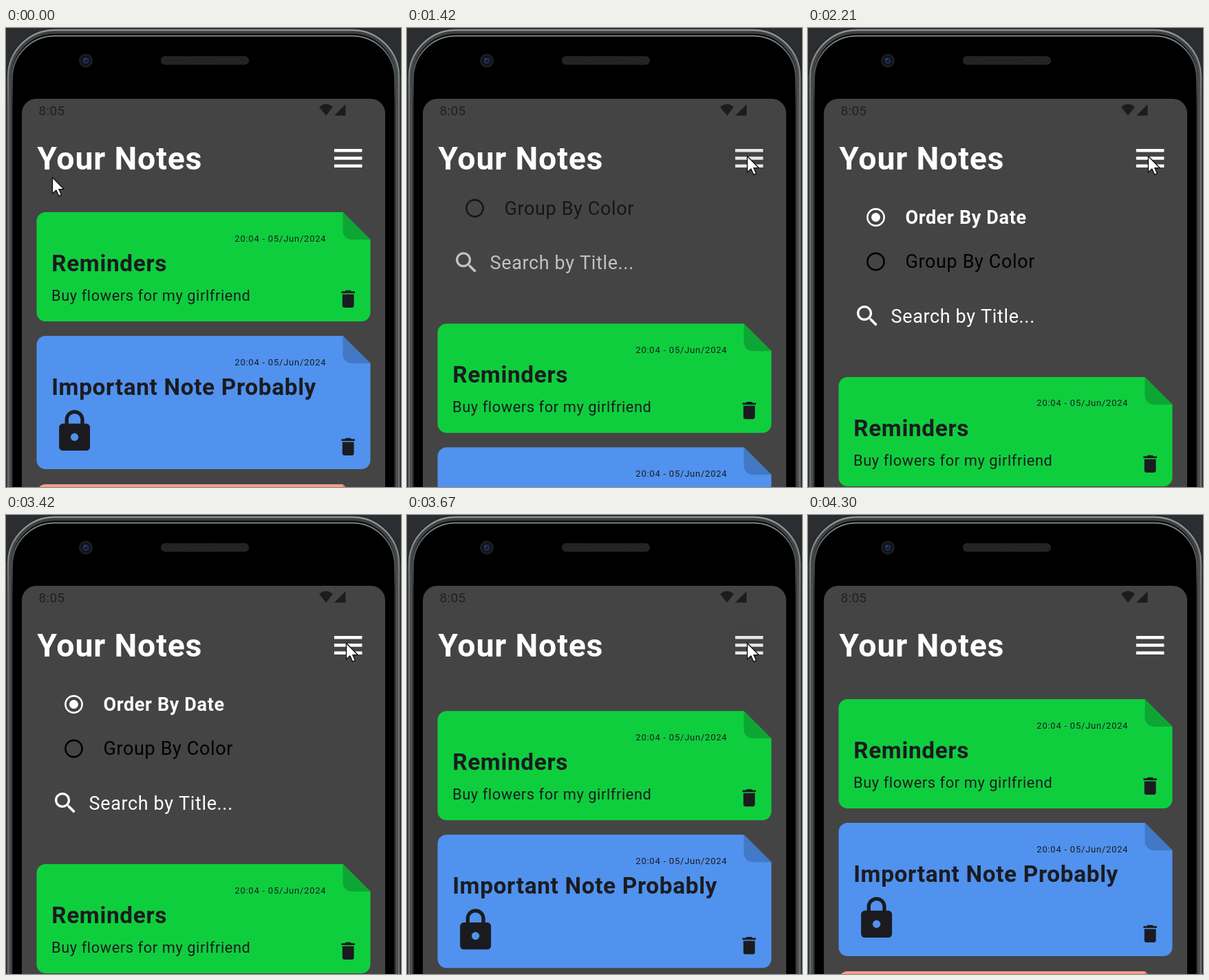
Write an HTML page with a canvas that moves like this. It is 574 px wide and 668 px high and loops after 5.03 s.

```html
<!DOCTYPE html>
<html lang="en">
<head>
<meta charset="utf-8">
<title>Notes</title>
<style>
html, body { margin: 0; width: 100%; height: 100%; overflow: hidden; background: #2b2d30; }
canvas { display: block; width: 574px; height: 668px; }
</style>
</head>
<body>
<canvas id="stage" width="574" height="668"></canvas>
<script>
const ctx = document.getElementById('stage').getContext('2d');
const W = 574, H = 668, LOOP = 5030;
const INK = '#1b1b1f', SCREEN = '#444444';
const MENU_H = 240, MENU_TOP = 228;
const OPEN = 1304.5, CLOSE = 3456;

const ICON = {
  menu: new Path2D('M3 18h18v-2H3zM3 13h18v-2H3zM3 6v2h18V6z'),
  trash: new Path2D('M6 19c0 1.1.9 2 2 2h8c1.1 0 2-.9 2-2V7H6v12zM19 4h-3.5l-1-1h-5l-1 1H5v2h14V4z'),
  lock: new Path2D('M18 8h-1V6c0-2.76-2.24-5-5-5S7 3.24 7 6v2H6c-1.1 0-2 .9-2 2v10c0 1.1.9 2 2 2h12c1.1 0 2-.9 2-2V10c0-1.1-.9-2-2-2zm-6 9c-1.1 0-2-.9-2-2s.9-2 2-2 2 .9 2 2-.9 2-2 2zm3.1-9H8.9V6c0-1.71 1.39-3.1 3.1-3.1s3.1 1.39 3.1 3.1v2z'),
  search: new Path2D('M15.5 14h-.79l-.28-.27C15.41 12.59 16 11.11 16 9.5 16 5.91 13.09 3 9.5 3S3 5.91 3 9.5 5.91 16 9.5 16c1.61 0 3.09-.59 4.23-1.57l.27.28v.79l5 4.99L20.49 19l-4.99-5zm-6 0C7.01 14 5 11.99 5 9.5S7.01 5 9.5 5 14 7.01 14 9.5 11.99 14 9.5 14z'),
  arrow: new Path2D('M0 0V23.5L5.4 18.6L9.2 27L13 25.3L9.4 17.1H16.6Z')
};

const CARDS = [
  { y: 268, h: 159, color: '#0fce3e', fold: '#0da634', title: 'Reminders', body: 'Buy flowers for my girlfriend' },
  { y: 448, h: 194, color: '#5092ee', fold: '#4279c6', title: 'Important Note Probably', locked: true },
  { y: 664, h: 159, color: '#fb9d88', fold: '#ce8170' }
];

const clamp = v => Math.min(1, Math.max(0, v));
const lerp = (a, b, p) => a + (b - a) * p;
const easeInOut = p => p * p * (3 - 2 * p);
const easeOut = p => 1 - (1 - p) ** 3;

// Critically damped spring, fraction still to travel.
function springLeft(ms) {
  const u = Math.max(0, ms) * 0.02;
  return (1 + u) * Math.exp(-u);
}

function text(str, x, y, size, color, bold, spacing = 0.64) {
  ctx.font = `${bold ? 700 : 400} ${size}px Roboto, sans-serif`;
  ctx.letterSpacing = spacing + 'px';
  ctx.fillStyle = color;
  ctx.fillText(str, x, y);
}

function icon(path, x, y, scale, color) {
  ctx.save();
  ctx.translate(x, y);
  ctx.scale(scale, scale);
  ctx.fillStyle = color;
  ctx.fill(path);
  ctx.restore();
}

function roundRect(x, y, w, h, r) {
  ctx.beginPath();
  ctx.roundRect(x, y, w, h, r);
}

function disc(x, y, r, color) {
  ctx.beginPath();
  ctx.arc(x, y, r, 0, 7);
  ctx.fillStyle = color;
  ctx.fill();
}

function rim(inset, top, r, width, color) {
  roundRect(inset, top, W - 2 * inset, H + 200, r);
  ctx.lineWidth = width;
  ctx.strokeStyle = color;
  ctx.stroke();
}

// Metal is brighter along the top edge than down the sides.
function metal(top, side) {
  const g = ctx.createLinearGradient(0, 0, 0, 110);
  g.addColorStop(0, top);
  g.addColorStop(1, side);
  return g;
}

function drawPhone() {
  ctx.fillStyle = '#2b2d30';
  ctx.fillRect(0, 0, W, H);
  roundRect(1, 1, W - 2, H + 200, 70);
  ctx.fillStyle = '#000';
  ctx.fill();
  rim(5, 5, 66, 7, metal('#3a3d3e', '#4a4d50'));
  rim(3, 3, 68, 2.5, metal('#8f9494', '#6c7072'));
  rim(9, 11.5, 62, 2, metal('#8a8f90', '#242627'));

  disc(116, 47.5, 10, '#1c1d20');
  disc(116, 47.5, 7, '#0e1017');
  disc(116, 47.5, 4.8, '#1f2b4c');
  disc(116, 47.5, 2.2, '#121a30');
  disc(114.5, 45.5, 1.1, '#4d5f8c');

  ctx.save();
  roundRect(225, 41, 128, 12.5, 6);
  ctx.fillStyle = '#1e1e1e';
  ctx.fill();
  ctx.clip();
  ctx.beginPath();
  for (let x = 215; x < 360; x += 4) {
    ctx.moveTo(x, 41);
    ctx.lineTo(x + 9, 54);
  }
  ctx.lineWidth = 1.3;
  ctx.strokeStyle = '#2d2d2d';
  ctx.stroke();
  ctx.restore();
}

function drawStatus() {
  text('8:05', 47.5, 126.5, 19, '#202020', false, 0.3);
  ctx.fillStyle = '#1c1c1c';
  ctx.beginPath();
  ctx.moveTo(465, 127.5);
  ctx.lineTo(455, 115);
  ctx.quadraticCurveTo(465, 106.5, 475, 115);
  ctx.fill();
  ctx.beginPath();
  ctx.moveTo(493.5, 111);
  ctx.lineTo(493.5, 127.5);
  ctx.lineTo(477, 127.5);
  ctx.fill();
}

function radio(y, color, on) {
  ctx.beginPath();
  ctx.arc(98.5, y, 12.1, 0, 7);
  ctx.lineWidth = 2.6;
  ctx.strokeStyle = color;
  ctx.stroke();
  if (on) disc(98.5, y, 6.5, color);
}

function drawMenu(open) {
  if (open < 0.002) return;
  ctx.save();
  ctx.beginPath();
  ctx.rect(23, MENU_TOP, 528, MENU_H * open);
  ctx.clip();
  ctx.globalAlpha = open;
  ctx.translate(0, MENU_H * (open - 1));
  radio(275.5, '#fff', true);
  text('Order By Date', 141.4, 284.7, 27, '#fff', true);
  radio(340, '#000', false);
  text('Group By Color', 141.4, 349.3, 27, '#000');
  icon(ICON.search, 65.9, 398.8, 1.7, '#fff');
  text('Search by Title...', 120.5, 428.7, 27, '#fff');
  ctx.restore();
}

function drawCard(card, shift) {
  const { h } = card, L = 44.5, R = 529.5, cut = 40, r = 13;
  if (card.y + shift > H) return;
  ctx.save();
  ctx.translate(0, card.y + shift);
  ctx.beginPath();
  ctx.moveTo(R - cut, 0);
  ctx.lineTo(R, cut);
  ctx.arcTo(R, h, L, h, r);
  ctx.arcTo(L, h, L, 0, r);
  ctx.arcTo(L, 0, R, 0, r);
  ctx.closePath();
  ctx.fillStyle = card.color;
  ctx.fill();

  ctx.beginPath();
  ctx.moveTo(R - cut, 0);
  ctx.lineTo(R, cut);
  ctx.arcTo(R - cut, cut, R - cut, 0, r);
  ctx.closePath();
  ctx.fillStyle = card.fold;
  ctx.fill();

  if (card.title) {
    text('20:04 - 05/Jun/2024', 332.3, 42.5, 13, INK, false, 0.77);
    text(card.title, 66.2, 85.8, 33.4, INK, true);
    icon(ICON.trash, 480.4, h - 49.4, 1.4, INK);
  }
  if (card.body) text(card.body, 66, 128.8, 21.85, INK, false, 0.56);
  if (card.locked) icon(ICON.lock, 65.9, 105.2, 2.81, INK);
  ctx.restore();
}

function drawRipple(age) {
  if (age < 0 || age > 480) return;
  const fade = clamp(age / 70) * clamp((480 - age) / 220);
  disc(497, 189.5, lerp(18, 32, easeOut(clamp(age / 225))), `rgba(58,58,58,${0.12 * fade})`);
}

function cursorAt(t) {
  if (t < 580) {
    const p = easeInOut(clamp((t - 20) / 550));
    return [lerp(67, 510, p), lerp(217, 262, p)];
  }
  if (t < 3960) {
    const p = easeInOut(clamp((t - 570) / 340));
    return [lerp(510, 494, p), lerp(262, 186, p)];
  }
  const p = clamp((t - 3960) / 330);
  return [lerp(494, 480, p), lerp(186, -30, p * p)];
}

function drawCursor(t) {
  if (t >= 4300) return;
  const [x, y] = cursorAt(t);
  ctx.save();
  ctx.translate(x + 0.5, y + 0.5);
  ctx.lineJoin = 'round';
  ctx.lineWidth = 1.4;
  ctx.strokeStyle = '#111';
  ctx.fillStyle = '#fff';
  ctx.fill(ICON.arrow);
  ctx.stroke(ICON.arrow);
  ctx.restore();
}

function draw(t) {
  let open = t < CLOSE ? 1 - springLeft(t - OPEN) : springLeft(t - CLOSE);
  if (t < 1330) open = 0;

  drawPhone();
  ctx.save();
  roundRect(23, 103, 528, H, 21);
  ctx.fillStyle = SCREEN;
  ctx.fill();
  ctx.clip();
  drawStatus();
  text('Your Notes', 45.2, 206, 46.5, '#fff', true, 0.8);
  icon(ICON.menu, 470.2, 162.5, 2.25, '#fff');
  drawRipple(t - 1330);
  drawRipple(t - 3440);
  drawMenu(open);
  for (const card of CARDS) drawCard(card, MENU_H * open);
  ctx.restore();
  drawCursor(t);
}

const start = performance.now();
function tick() {
  draw((performance.now() - start) % LOOP);
  requestAnimationFrame(tick);
}
tick();
</script>
</body>
</html>
```
